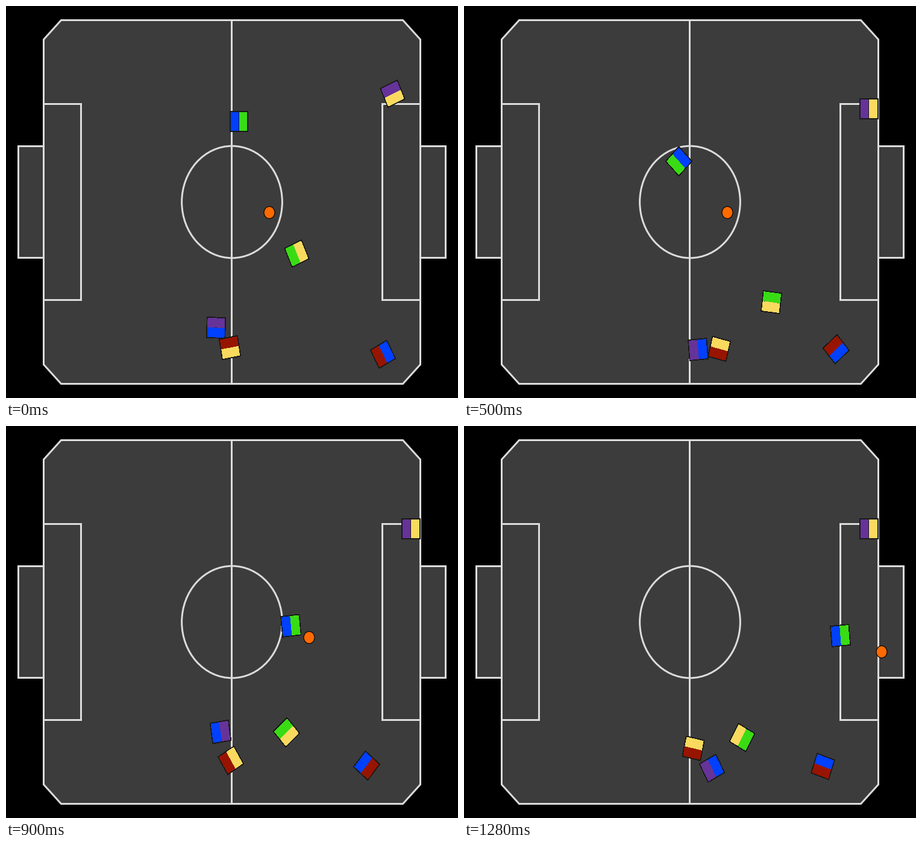
These frames come from a looping animation (750x650 px, 1.33 s). A matplotlib script:

```python
import numpy as np
import matplotlib.pyplot as plt
from matplotlib.animation import FuncAnimation
from matplotlib.patches import Ellipse, Polygon

W, H, DPI = 750, 650, 100
SX, SY = W / 180, H / 140          # pixels per centimetre on each axis
STEPS = 65                         # 20 ms each, the last one held for 50 ms
TICK, TICKS = 10, 133

GRAY, LINE, BODY = "#3c3c3c", "#dcdcdc", "#191919"
BLUE, YELLOW = "#0040ff", "#fada5e"
GREEN, PURPLE, RED = "#39dc14", "#663399", "#971500"
ORANGE = "#ff6a00"

# Waypoints: step, pixel x, pixel y, heading in degrees
ROBOTS = [
    (BLUE, GREEN, [(0, 386, 191, 0), (11, 367, 218, 75), (25, 356, 257, 225),
                   (41, 438, 335, 364), (50, 515, 324, 367), (64, 624, 347, 365)]),
    (BLUE, PURPLE, [(0, 348, 533, 88), (25, 388, 569, 185), (41, 381, 517, 330),
                    (50, 325, 522, 419), (64, 411, 567, 568)]),
    (BLUE, RED, [(0, 625, 577, 208), (11, 633, 574, 165), (33, 610, 561, 104),
                 (50, 599, 555, -82), (64, 595, 564, -109)]),
    (YELLOW, GREEN, [(0, 482, 410, 204), (11, 491, 415, 152), (33, 480, 522, 26),
                     (41, 462, 505, -132), (64, 461, 516, -749)]),
    (YELLOW, RED, [(0, 371, 566, 100), (11, 373, 572, 116), (25, 423, 568, 256),
                   (33, 397, 516, 358), (41, 351, 544, 499), (50, 386, 527, 667),
                   (64, 380, 534, 978)]),
    (YELLOW, PURPLE, [(0, 641, 145, 114), (15, 671.4, 170, 180)]),
]
KICK = 38.4                        # step at which the ball starts to roll


def to_field(x, y):
    return (x + 0.5 - W / 2) / SX, (H / 2 - y - 0.5) / SY


def smooth(t, s, v):
    """Monotone cubic through the points (s, v), held after the last one."""
    h = np.diff(s)
    d = np.diff(v) / h
    inner = [2 * p * q / (p + q) if p * q > 0 else 0 for p, q in zip(d, d[1:])]
    m = np.array([d[0], *inner, d[-1]])
    t = np.minimum(t, s[-1])
    i = np.clip(np.searchsorted(s, t, side="right") - 1, 0, len(h) - 1)
    u = (t - s[i]) / h[i]
    return (v[i] + u**2 * (3 - 2 * u) * (v[i + 1] - v[i])
            + h[i] * (u * (1 - u)**2 * m[i] + u**2 * (u - 1) * m[i + 1]))


def drive(keys):
    """Wheeled motion: the path bends with the heading, tight spins stay put."""
    s, x, y, a = np.array(keys, float).T
    x, y = to_field(x, y)
    p = x + 1j * y
    sub = 10
    fine = np.arange(sub * (STEPS - 1) + 1) / sub
    spin = np.exp(1j * np.radians(smooth(fine, s, a)))
    z = np.cumsum(spin)
    pos = np.full(len(fine), p[-1])
    marks = (s * sub).astype(int)
    for k, (i, j) in enumerate(zip(marks, marks[1:])):
        u = np.linspace(0, 1, j - i + 1)
        chord = z[j] - z[i]
        bend = min(1, 2 * abs(chord) / (j - i))
        part = u + bend * ((z[i:j + 1] - z[i]) / chord - u)
        pos[i:j + 1] = p[k] + (p[k + 1] - p[k]) * part
    return pos[::sub], spin[::sub]


def roll(n):
    t = max(0, n - KICK)
    return to_field(436.5 + 10 * t, 342 + 1.25 * t)


def box(x0, x1, y):
    return np.array([x0 - 1j * y, x1 - 1j * y, x1 + 1j * y, x0 + 1j * y])


BODY_BOX = box(-3.75, 3.75, 3.75)
TEAM_BOX, TAG_BOX = box(-3.35, -0.12, 3.35), box(0.12, 3.35, 3.35)

fig = plt.figure(figsize=(W / DPI, H / DPI), dpi=DPI, facecolor="black")
ax = fig.add_axes([0, 0, 1, 1])
ax.set_xlim(-90, 90)
ax.set_ylim(-70, 70)
ax.axis("off")

LINE_W = 3 * 72 / DPI


def outline(points, closed=True):
    # a half-pixel shift up and left settles lines on whole pixels
    pts = np.array(points, float) + (-0.55 / SX, 0.55 / SY)
    ax.add_patch(Polygon(pts, closed=closed, fc=GRAY if closed else "none", ec=LINE,
                         lw=LINE_W, joinstyle="miter", snap=True))


def rect(x0, x1, y):
    outline([(x0, -y), (x1, -y), (x1, y), (x0, y)])


corner = [(-75, 58), (-68, 65)]
top = corner + [(-x, y) for x, y in corner[::-1]]
outline(top + [(x, -y) for x, y in top[::-1]])
for side in (-1, 1):
    rect(75 * side, 60 * side, 35)
    rect(75 * side, 85 * side, 20)
outline([(0, -65), (0, 65)], closed=False)
ax.add_patch(Ellipse((0, 0), 40, 40, fill=False, ec=LINE, lw=LINE_W))

cars = []
for team, tag, keys in ROBOTS:
    parts = []
    for shape, color in ((BODY_BOX, BODY), (TEAM_BOX, team), (TAG_BOX, tag)):
        patch = Polygon(np.zeros((4, 2)), fc=color, ec="none", aa=False)
        parts.append((shape, ax.add_patch(patch)))
    cars.append((parts, *drive(keys)))

ball = ax.add_patch(Ellipse((0, 0), 4.3, 4.3, fc=ORANGE, ec="black", lw=0.8))


def update(tick):
    n = min(tick * TICK // 20, STEPS - 1)
    for parts, pos, spin in cars:
        for shape, patch in parts:
            c = pos[n] + shape * spin[n]
            patch.set_xy(np.column_stack((c.real, c.imag)))
    ball.set_center(roll(n))


anim = FuncAnimation(fig, update, frames=TICKS, interval=TICK,
                     repeat=True, repeat_delay=0, blit=False)
plt.show()
```
